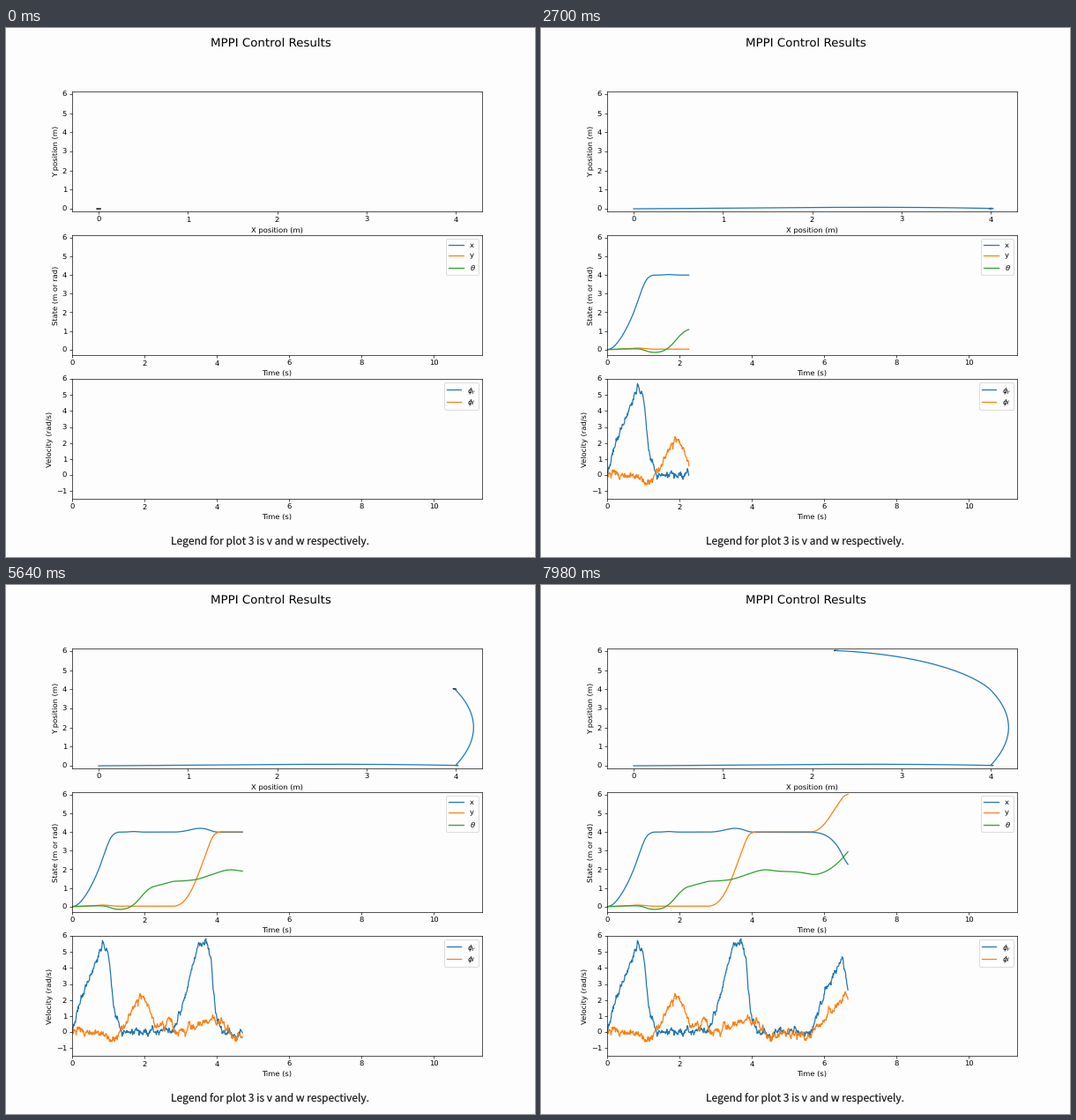
Recreate the animation shown at these times as a matplotlib script. Size 600 px wide and 600 px high, loop 8000 ms.

```python
import numpy as np
import matplotlib.pyplot as plt
from matplotlib.animation import FuncAnimation
from matplotlib.patches import Polygon

INTERVAL, FRAMES, STEP_MS = 40, 200, 60
DT, PER_STEP = 0.01, 5
PAPER = "#fdfdfd"

t = np.arange(0, 6.665, DT)

# Each leg of the drive: speed profile as (time, speed) keys, and its Bezier path.
LEGS = [
    ([(0, 0), (.25, 2.2), (.5, 3.5), (.7, 4.5), (.83, 5.6), (.95, 5.3),
      (1.02, 4.5), (1.15, 1.5), (1.32, 0)],
     [(0, 0), (1.33, .03), (2.67, .15), (4, .02)]),
    ([(2.8, 0), (3, 1.2), (3.36, 4.4), (3.5, 5.3), (3.72, 5.8), (3.84, 4.8),
      (3.97, 1.3), (4.15, 0)],
     [(4, .02), (4.27, 1.36), (4.27, 2.7), (3.99, 4.02)]),
    ([(5.65, 0), (6.05, 2.6), (6.3, 3.7), (6.5, 4.85), (6.67, 2.4)],
     [(3.99, 4.02), (3.76, 4.92), (3.18, 5.83), (2.27, 6.03)]),
]
TURNS = [(0, .1), (.8, 0), (1.07, -.75), (1.35, .1), (1.5, .5), (1.87, 2.4),
         (2.1, 1.65), (2.27, .5), (2.75, .55), (2.85, .05), (3.3, .2), (3.65, .7),
         (4.15, .6), (4.55, -.35), (4.9, 0), (5.62, -.4), (5.8, .3), (6.6, 2.35),
         (6.67, 2.2)]


def profile(keys):
    return np.interp(t, *zip(*keys), left=0, right=0)


def bezier(points, u):
    p0, p1, p2, p3 = np.array(points)[:, :, None]
    r = 1 - u
    return r ** 3 * p0 + 3 * r * r * u * p1 + 3 * r * u * u * p2 + u ** 3 * p3


def jitter(seed, sd, keep=0.75):
    rng = np.random.default_rng(seed)
    out = np.zeros(len(t))
    for i, e in enumerate(rng.normal(0, sd * np.sqrt(1 - keep ** 2), len(t) - 1), 1):
        out[i] = keep * out[i - 1] + e
    return out


speed = np.zeros(len(t))
pos = np.zeros((2, len(t)))
for keys, points in LEGS:
    leg = profile(keys)
    u = np.cumsum(leg) / leg.sum()
    speed += leg
    pos = np.where(t >= keys[0][0], bezier(points, u), pos)
x, y = pos
x = x + 0.03 * np.exp(-((t - 1.7) / 0.15) ** 2)  # small overshoot at the first stop

turn = profile(TURNS)
theta = np.cumsum(turn) * DT
v = speed + jitter(4, 0.14)
w = turn + jitter(9, 0.15)

plt.rcParams.update({"font.family": "DejaVu Sans", "text.hinting": "none"})
fig, (ax_path, ax_state, ax_vel) = plt.subplots(3, 1, figsize=(10, 10), dpi=60,
                                                facecolor=PAPER)
fig.suptitle("MPPI Control Results", fontsize=16)
fig.text(299.3 / 600, 14 / 600, "Legend for plot 3 is v and w respectively.",
         family="Noto Sans CJK JP", fontsize=14.4, color="#222222",
         ha="center", va="baseline")


def setup(ax, xlim, ylim, xlabel, ylabel, first_tick=0):
    ax.set(xlim=xlim, ylim=ylim, xlabel=xlabel, ylabel=ylabel, facecolor=PAPER,
           yticks=range(first_tick, 7))


setup(ax_path, (-0.297, 4.297), (-0.13, 6.14), "X position (m)", "Y position (m)")
setup(ax_state, (0, 11.34), (-0.295, 6.14), "Time (s)", "State (m or rad)")
setup(ax_vel, (0, 11.34), (-1.48, 6.0), "Time (s)", "Velocity (rad/s)", -1)

curves = [(ax_path.plot([], [])[0], x, y)]
for ax, series in ((ax_state, {"x": x, "y": y, r"$\theta$": theta}),
                   (ax_vel, {r"$\phi_r$": v, r"$\phi_l$": w})):
    for label, data in series.items():
        curves.append((ax.plot([], [], label=label)[0], t, data))
ax_state.legend(loc="upper right")
ax_vel.legend(loc="upper right", labelspacing=0.25, borderpad=0.3)

BODY = np.array([[-1, -1], [1, -1], [1, 1], [-1, 1]]) * (0.024, 0.015)
robot = ax_path.add_patch(Polygon(BODY, facecolor="black", edgecolor="black",
                                  linewidth=0.7))


def update(i):
    step = (i * INTERVAL + INTERVAL // 2) // STEP_MS
    n = PER_STEP * step + 2 if step else 0
    for line, xs, ys in curves:
        line.set_data(xs[:n], ys[:n])
    j = max(n - 1, 0)
    c, s = np.cos(theta[j]), np.sin(theta[j])
    robot.set_xy(BODY @ np.array([[c, s], [-s, c]]) + (x[j], y[j]))
    return [robot] + [curve[0] for curve in curves]


anim = FuncAnimation(fig, update, frames=FRAMES, interval=INTERVAL, repeat=True,
                     repeat_delay=0)
plt.show()
```
